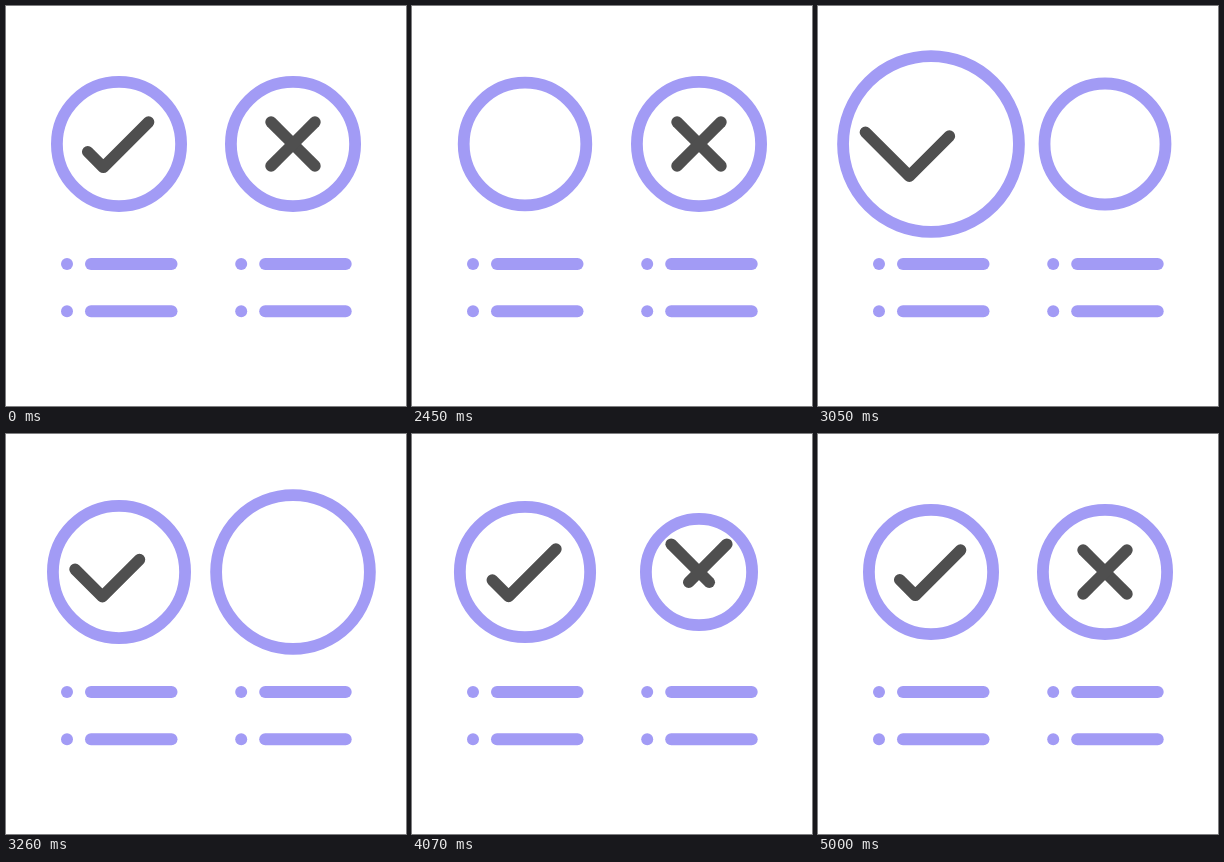
Write an HTML page with a canvas that moves like this. It is 400x400 px and loops after 5030 ms.

```html
<!DOCTYPE html>
<html lang="en">
<head>
<meta charset="utf-8">
<title>Check and cross lists</title>
<style>
html, body { margin: 0; width: 100%; height: 100%; overflow: hidden; background: #fff; }
canvas { display: block; width: 400px; height: 400px; }
</style>
</head>
<body>
<canvas id="stage" width="400" height="400"></canvas>
<script>
const ctx = document.getElementById('stage').getContext('2d');
const LOOP = 5030, START = 2000, STEP = 30;
const VIOLET = '#a29bf5', GREY = '#4f4f4f';
const REST = 68, RING_W = 11.8, MARK_W = 11.6;

// Ring: dips, swells to a peak, falls back and bounces.
const DIP_AT = 270, PEAK_AT = 880, LAND_AT = 1280, DIP = 60;
// Mark: wiped away, then slides in from the top and bounces.
const WIPE = 400, ARRIVE = 1005, SPEED = 0.0044;

const swing = (a, b, u) => a + (b - a) * (1 - Math.cos(Math.PI * u)) / 2;

// Two damped half-swings, first downwards, then still.
function bounce(t, amp, half, decay) {
  if (t > 2 * half) return 0;
  return -amp * Math.exp(-decay * t) * Math.sin(Math.PI * t / half);
}

function ringRadius(t, peak) {
  if (t <= 0) return REST;
  if (t < DIP_AT) return swing(REST, DIP, t / DIP_AT);
  if (t < PEAK_AT) return swing(DIP, peak, (t - DIP_AT) / (PEAK_AT - DIP_AT));
  if (t < LAND_AT) {
    const u = (t - PEAK_AT) / (LAND_AT - PEAK_AT);
    return peak + (REST - peak) * u ** 3;
  }
  return REST + bounce(t - LAND_AT, 13.5, 490, 0.0018);
}

// Visible stretch of a mark, as distances along its path.
function markSpan(t, tail, head) {
  const len = head - tail;
  if (t <= 0) return [tail, head];
  if (t < WIPE) return [tail, head - len * t / WIPE];
  const shift = t < ARRIVE
    ? len * SPEED * (ARRIVE - t)
    : bounce(t - ARRIVE, 0.65 * len, 300, 0.0022);
  return [tail + shift, head + shift];
}

// Paths are relative to the badge centre.
const tickAt = s => [-15.7 + s * Math.SQRT1_2, 23.3 - Math.abs(s) * Math.SQRT1_2];
const slashAt = side => s => [side * s * Math.SQRT1_2, -s * Math.SQRT1_2];

const badges = [
  { x: 113, delay: 0, peak: 96, tail: -22, head: 64, paths: [tickAt] },
  { x: 287, delay: 600, peak: 92, tail: -31, head: 31, paths: [slashAt(-1), slashAt(1)] }
];

function line(points, width, color) {
  ctx.lineWidth = width;
  ctx.strokeStyle = color;
  ctx.beginPath();
  points.forEach(([x, y]) => ctx.lineTo(x, y));
  ctx.stroke();
}

function circle(x, y, r) {
  ctx.beginPath();
  ctx.arc(x, y, r, 0, Math.PI * 2);
}

function drawBadge(b, time) {
  const t = time - b.delay;
  const r = ringRadius(t, b.peak), mid = r - RING_W / 2, scale = r / REST;
  const [tail, head] = markSpan(t, b.tail, b.head);
  ctx.save();
  ctx.translate(b.x, 138);
  ctx.save();
  circle(0, 0, mid);
  ctx.clip();
  for (const at of b.paths) {
    const stops = tail < 0 && head > 0 ? [tail, 0, head] : [tail, head];
    line(stops.map(s => at(s).map(v => v * scale)), MARK_W, GREY);
  }
  ctx.restore();
  circle(0, 0, mid);
  ctx.lineWidth = RING_W;
  ctx.strokeStyle = VIOLET;
  ctx.stroke();
  ctx.restore();
}

function drawLists() {
  ctx.fillStyle = VIOLET;
  for (const x of [61, 235.2]) {
    for (const y of [258, 305.2]) {
      circle(x, y, 6);
      ctx.fill();
      line([[x + 24, y], [x + 104.5, y]], 12, VIOLET);
    }
  }
}

function draw(now) {
  const time = Math.floor((now % LOOP - START) / STEP) * STEP;
  ctx.fillStyle = '#fff';
  ctx.fillRect(0, 0, 400, 400);
  ctx.lineCap = ctx.lineJoin = 'round';
  drawLists();
  badges.forEach(b => drawBadge(b, time));
}

const begin = performance.now();
function loop() {
  draw(performance.now() - begin);
  requestAnimationFrame(loop);
}
loop();
</script>
</body>
</html>
```
